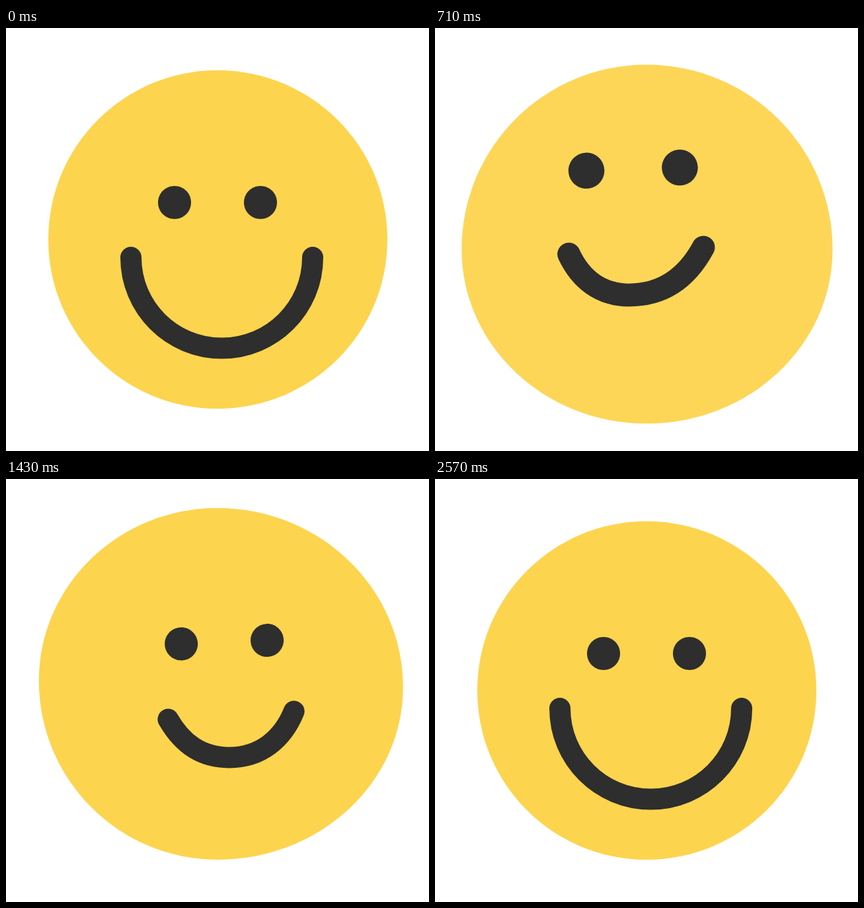
Animation of 640x640 px, one loop 2.78 s. Source, as an HTML page with a canvas:

```html
<!DOCTYPE html>
<html lang="en">
<head>
<meta charset="utf-8">
<title>Smiley</title>
<style>
  html, body { margin: 0; width: 100%; height: 100%; overflow: hidden; background: #fff; }
  canvas { display: block; }
</style>
</head>
<body>
<canvas id="stage" width="640" height="640"></canvas>
<script>
const ctx = document.getElementById('stage').getContext('2d');
const LOOP = 2780, FPS = 14, MOVE_END = 27, GROW_END = 13;
const ROUND = .5523; // handle length that makes a Bezier quarter circular
const MOUTH = 137.5, EYE = 25, EYE_GAP = 65, DARK = '#2d2e2d';

// Smooth track through keys [step, ...values], ending where it began, at rest at both ends
function track(...keys) {
  keys.push([MOVE_END, ...keys[0].slice(1)]);
  const last = keys.length - 1;
  return step => {
    const t = Math.min(step, MOVE_END);
    const i = Math.max(1, keys.findIndex(key => key[0] >= t)) - 1;
    const span = keys[i + 1][0] - keys[i][0];
    const u = (t - keys[i][0]) / span, v = 1 - u;
    return keys[0].slice(1).map((_, n) => {
      const at = k => keys[k][n + 1];
      const slope = k => k === 0 || k === last ? 0
        : (at(k + 1) - at(k - 1)) / (keys[k + 1][0] - keys[k - 1][0]) * span;
      return at(i) * v * v * (1 + 2 * u) + at(i + 1) * u * u * (3 - 2 * u)
        + slope(i) * u * v * v - slope(i + 1) * u * u * v;
    });
  };
}

// step, half width, top, left side y, right side y
const head = track(
  [0, 256.5, 64, 320, 320],
  [6, 247, 65, 322, 322],
  [13, 266.5, 81, 340, 340],
  [18, 265, 50, 328, 329],
  [20.5, 277, 44, 300, 312],
  [23, 271, 54, 287, 304]
);

// step, eyes x, y, mouth corners x, y, smile depth, slope
const features = track(
  [0, 320, 264, 326.5, 347, 1, 0],
  [4, 325, 246.4, 338.5, 383.5, .364, -.09],
  [8, 313.2, 197.8, 323, 301.5, .418, -.095],
  [13, 290.5, 270, 288, 405, .473, .01],
  [18, 334.5, 260.5, 345.3, 385, .371, -.08],
  [23, 315, 230.2, 322, 319, .687, -.015]
);

function blob(left, right, top, bottom, x, leftY, rightY, tall = ROUND) {
  const quarter = (sideX, sideY, endY, toSide) => {
    const side = [sideX, sideY + (endY - sideY) * tall];
    const end = [x + (sideX - x) * ROUND, endY];
    if (toSide) ctx.bezierCurveTo(...end, ...side, sideX, sideY);
    else ctx.bezierCurveTo(...side, ...end, x, endY);
  };
  ctx.beginPath();
  ctx.moveTo(left, leftY);
  quarter(left, leftY, top, false);
  quarter(right, rightY, top, true);
  quarter(right, rightY, bottom, false);
  quarter(left, leftY, bottom, true);
  ctx.fill();
}

function drawMouth(x, y, smile, slope, eyeX) {
  const half = MOUTH * smile ** .48;
  const bottomX = x + .4 * (1 - smile) * (eyeX - 345) * (smile < 1), bottomY = y + MOUTH * smile;
  // A shallower side leans its corner inwards and tightens its bottom
  const side = dir => {
    const cornerX = x + dir * half, cornerY = y + dir * half * slope;
    const w = bottomX - cornerX, h = bottomY - cornerY;
    const lean = .6 * (1 - h / Math.abs(w));
    return {
      corner: [cornerX, cornerY],
      upper: [cornerX + w * lean, cornerY + h * (ROUND + .3 * lean)],
      lower: [bottomX - w * (ROUND - .4 * lean), bottomY]
    };
  };
  const l = side(-1), r = side(1);
  ctx.lineWidth = 32;
  ctx.lineCap = ctx.lineJoin = 'round';
  ctx.beginPath();
  ctx.moveTo(...l.corner);
  ctx.bezierCurveTo(...l.upper, ...l.lower, bottomX, bottomY);
  ctx.bezierCurveTo(...r.lower, ...r.upper, ...r.corner);
  ctx.stroke();
}

function drawEye(x, lid, width = EYE) {
  const height = EYE * lid;
  blob(x - width, x + width, -height, height, x, 0, 0, Math.min(1, ROUND / lid));
}

const lidAt = (step, closed) => Math.min(1, .2 + .58 * Math.abs(step - closed));

function draw(step) {
  const [half, top, leftY, rightY] = head(step);
  const [eyeX, eyeY, mouthX, mouthY, smile, slope] = features(step);
  const grow = step < GROW_END ? Math.sin(Math.PI * step / GROW_END) ** 2 : 0;
  const scale = 1 + .2 * grow, shift = 320 * (1 - scale);

  ctx.setTransform(1, 0, 0, 1, 0, 0);
  ctx.clearRect(0, 0, 640, 640);
  ctx.setTransform(scale, 0, 0, scale, shift, shift);

  const middle = 320.5 + .25 * (half - 256.5);
  ctx.fillStyle = `rgb(253, ${Math.round(212 + 4 * grow)}, ${Math.round(78 + 22 * grow)})`;
  blob(middle - half, middle + half, top, 576, 320, leftY, rightY);

  ctx.strokeStyle = ctx.fillStyle = DARK;
  drawMouth(mouthX, mouthY, smile, slope, eyeX);

  const blink = lidAt(step, 3), wink = lidAt(step, 34.4);
  ctx.translate(eyeX, eyeY);
  ctx.rotate(slope * .65);
  drawEye(-EYE_GAP, blink);
  drawEye(EYE_GAP, blink * wink, EYE * (1 + .8 * (1 - wink)));
}

function tick() {
  const time = performance.now() % LOOP;
  draw(Math.floor((time + 5) * FPS / 1000));
  requestAnimationFrame(tick);
}
tick();
</script>
</body>
</html>
```
